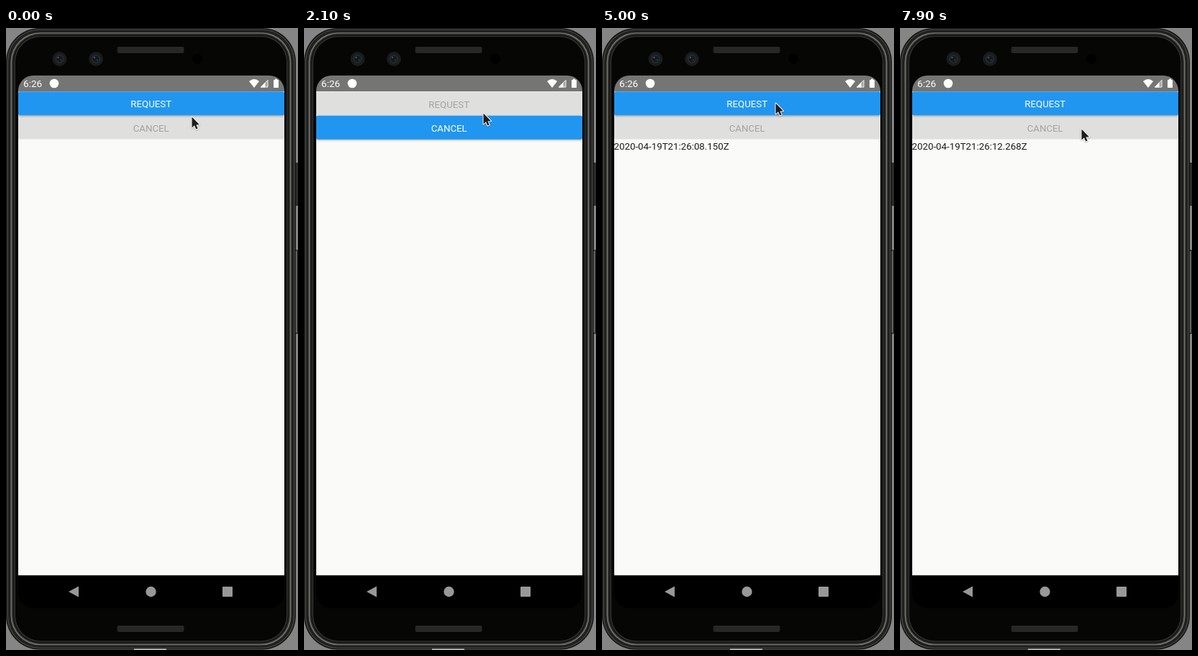
These frames come from a looping animation (406 by 864 pixels, 8 s). An HTML page with a canvas:

```html
<!DOCTYPE html>
<html lang="en">
<head>
<meta charset="utf-8">
<title>Request demo</title>
<style>
html, body { margin: 0; width: 100%; height: 100%; overflow: hidden; background: #858585; }
canvas { display: block; width: 406px; height: 864px; }
</style>
</head>
<body>
<canvas id="stage" width="406" height="864"></canvas>
<script>
const W = 406, H = 864, LOOP = 8000;
const ctx = document.getElementById('stage').getContext('2d');
const FONT = 'Roboto, "Noto Sans", sans-serif';

// Pointer positions: time, x, y; each holds until the next
const POINTER = [
  [0, 257, 122], [100, 249, 110], [400, 248, 110],
  [2100, 248, 117], [2200, 248, 126], [2300, 248, 131],
  [2700, 253, 135], [2800, 263, 133], [2900, 270, 130],
  [4000, 270, 128], [4100, 270, 127], [4500, 256, 106], [4600, 240, 89],
  [4900, 240, 96], [5000, 240, 103],
  [6100, 243, 112], [6200, 248, 126], [6300, 251, 134], [6500, 251, 139]
];
const ARROW = [[1.5, 1.5], [1.5, 16.4], [5, 13.2], [7.3, 18.6], [9.7, 17.6], [7.4, 12.4], [12, 12.2]];
const REQUESTS = [
  { start: 700, end: 3800, ripple: 153, stamp: '2020-04-19T21:26:08.150Z' },
  { start: 5700, end: 7900, ripple: 174, stamp: '2020-04-19T21:26:12.268Z' }
];

function rect(c, x, y, w, h, fill) {
  c.fillStyle = fill;
  c.fillRect(x, y, w, h);
}

function round(c, x, y, w, h, r, fill) {
  c.beginPath();
  c.roundRect(x, y, w, h, r);
  c.fillStyle = fill;
  c.fill();
}

function disc(c, x, y, r, fill) {
  c.beginPath();
  c.arc(x, y, r, 0, 7);
  c.fillStyle = fill;
  c.fill();
}

function poly(c, points, fill) {
  c.beginPath();
  points.forEach(([x, y]) => c.lineTo(x, y));
  c.closePath();
  c.fillStyle = fill;
  c.fill();
}

function label(c, str, x, y, fill, size = 13.2, align = 'left') {
  c.font = `${size}px ${FONT}`;
  c.textAlign = align;
  c.textBaseline = 'alphabetic';
  c.fillStyle = fill;
  c.fillText(str, x, y);
}

function speaker(c, y) {
  round(c, 154.5, y, 93, 9, 2, '#222221');
  for (let row = 0; row < 4; row++) {
    for (let x = 156 + row % 2; x < 247; x += 2) rect(c, x, y + 1 + row * 2, 1, 1, '#393937');
  }
}

function camera(c, x) {
  disc(c, x, 43, 10, '#191b1d');
  disc(c, x, 43, 6.5, '#22272b');
  disc(c, x, 43, 4, '#14181c');
  disc(c, x - 2, 41, 1.2, '#4a5258');
  disc(c, x + 2, 44.5, 1, '#3b4248');
}

function drawBody(c) {
  rect(c, 0, 0, W, H, '#858585');
  // side keys
  rect(c, 402, 187, 4, 60, '#2b2b2b');
  rect(c, 402, 308, 4, 117, '#343434');
  rect(c, 403, 310, 1, 113, '#8d8d8d');

  // nested shells of the frame: inset, radius, colour
  const shells = [
    [0, 47, '#141413'], [1.5, 46, '#454543'], [3, 44, '#20201f'],
    [6.5, 41, '#73736f'], [8, 40, '#373735'], [9.5, 38, '#161615'],
    [11.5, 36, '#30302e'], [13, 35, '#060605']
  ];
  for (const [d, r, fill] of shells) round(c, d, d * 0.95, 403 - 2 * d, 863.5 - 1.9 * d, r, fill);
  rect(c, 178, 862.5, 45, 1.5, '#d0d0d0');

  speaker(c, 26);
  speaker(c, 830);
  camera(c, 74.5);
  camera(c, 125);
  disc(c, 266, 43, 7, '#000');
}

function drawStatus(c) {
  rect(c, 17, 66, 370, 22, '#757573');
  label(c, '6:26', 24, 82, '#fff', 13.6);
  disc(c, 67, 77, 6.3, '#fff');

  c.beginPath();
  c.moveTo(345, 83);
  c.lineTo(338, 74);
  c.quadraticCurveTo(345, 68.2, 352, 74);
  c.closePath();
  c.fillStyle = '#fff';
  c.fill();

  c.beginPath();
  [[364.3, 71.8], [364.3, 82.4], [353.9, 82.4]].forEach(p => c.lineTo(...p));
  c.closePath();
  c.fillStyle = '#a5a5a4';
  c.fill();
  poly(c, [[360.5, 75.6], [360.5, 82.4], [353.9, 82.4]], '#fff');
  c.strokeStyle = '#fff';
  c.lineWidth = 0.8;
  c.beginPath();
  [[364, 72.5], [364, 82], [354.5, 82]].forEach(p => c.lineTo(...p));
  c.closePath();
  c.stroke();

  round(c, 372, 72, 7, 11, 0.8, '#fff');
  rect(c, 374, 70.7, 3, 2, '#fff');
}

function drawScreen(c) {
  c.save();
  c.beginPath();
  c.roundRect(17, 66, 370, 740, 21);
  c.clip();
  drawStatus(c);
  rect(c, 17, 88, 370, 672.5, '#fafaf9');
  rect(c, 17, 760.5, 370, 46, '#000');
  c.restore();

  poly(c, [[87, 783], [101, 775.5], [101, 790.5]], '#989898');
  disc(c, 201.5, 783, 7.2, '#989898');
  round(c, 301, 776, 14, 14, 1, '#989898');
}

function button(str, y, on, ripple) {
  const h = 33;
  ctx.save();
  ctx.beginPath();
  ctx.rect(17, 88, 370, 80);
  ctx.clip();
  if (on) {
    ctx.shadowColor = 'rgba(0,0,0,.32)';
    ctx.shadowBlur = 3;
    ctx.shadowOffsetY = 1;
  }
  round(ctx, 17, y, 370, h, 2, on ? '#2196f0' : '#dfdfde');
  ctx.shadowColor = 'transparent';
  if (ripple) {
    ctx.beginPath();
    ctx.rect(17, y, 370, h);
    ctx.clip();
    disc(ctx, 201.7, y + h / 2, ripple, '#d3d3d2');
  }
  ctx.restore();
  label(ctx, str, 201.7, y + 22, on ? '#fff' : '#a3a3a2', 13.25, 'center');
}

function pointer(x, y) {
  ctx.save();
  ctx.translate(x, y);
  ctx.lineJoin = 'round';
  ctx.lineWidth = 2;
  ctx.strokeStyle = '#fff';
  ctx.shadowColor = 'rgba(0,0,0,.3)';
  ctx.shadowBlur = 2;
  ctx.shadowOffsetY = 0.7;
  ctx.beginPath();
  ARROW.forEach(p => ctx.lineTo(...p));
  ctx.closePath();
  ctx.stroke();
  ctx.shadowColor = 'transparent';
  poly(ctx, ARROW, '#1c1c1c');
  ctx.restore();
}

const phone = document.createElement('canvas');
phone.width = W;
phone.height = H;

function paintPhone() {
  const c = phone.getContext('2d');
  drawBody(c);
  drawScreen(c);
}

function draw(t) {
  ctx.drawImage(phone, 0, 0);
  const active = REQUESTS.find(r => t >= r.start && t < r.end);
  const done = REQUESTS.filter(r => t >= r.end).pop();
  const ripple = active && t < active.start + 100 ? active.ripple : 0;

  // the raised button is painted last so its shadow falls on the other
  if (active) {
    button('REQUEST', 88.5, false, ripple);
    button('CANCEL', 121.7, true);
  } else {
    button('CANCEL', 121.5, false);
    button('REQUEST', 88.3, true);
  }
  if (done) label(ctx, done.stamp, 16.5, 169, '#1c1c1c', 13.3);

  const [, x, y] = POINTER.filter(p => p[0] <= t).pop();
  pointer(x, y);
}

paintPhone();
const begin = performance.now();
function tick() {
  draw((performance.now() - begin) % LOOP);
  requestAnimationFrame(tick);
}
tick();
</script>
</body>
</html>
```
